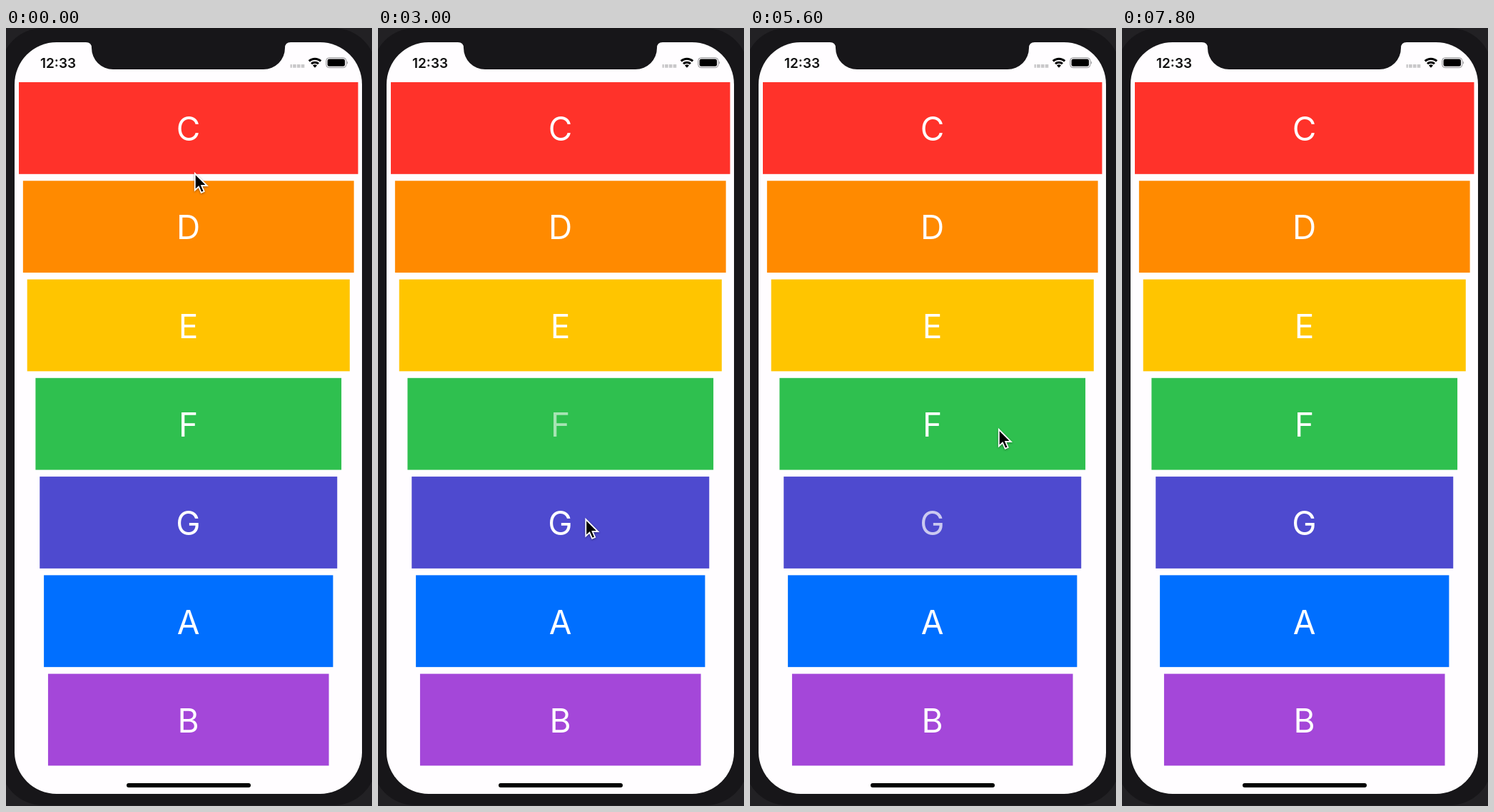
These frames come from a looping animation (513x1091 px, 8 s). An HTML page:

```html
<!DOCTYPE html>
<html lang="en">
<head>
<meta charset="utf-8">
<title>Xylophone</title>
<style>
  html, body { margin: 0; width: 100%; height: 100%; overflow: hidden; background: #222124; }
  svg { display: block; width: 513px; height: 1091px; }
  text { font-family: Inter, "Liberation Sans", sans-serif; }
  .note { font-size: 46px; fill: #fff; text-anchor: middle; }
  #cursor { filter: drop-shadow(0 1.5px 1.5px rgba(0, 0, 0, .4)); }
</style>
</head>
<body>
<svg viewBox="0 0 513 1091">
  <rect x="-8" y="0" width="527" height="1090" rx="60" fill="#171619"/>
  <rect x="12" y="20" width="487" height="1054" rx="59" fill="#fffdff"/>
  <path d="M112 18V20Q120 20 120 28A30 30 0 0 0 150 58H361A30 30 0 0 0 391 28Q391 20 399 20V18Z" fill="#171619"/>

  <text x="48" y="56" font-size="19" font-weight="600" fill="#111">12:33</text>
  <path d="M398.5 53.4H419" stroke="#c9c8ca" stroke-width="4.8" stroke-dasharray="4.6 1.2" stroke-dashoffset="2.2"/>
  <g fill="none" stroke="#000" stroke-width="3">
    <path d="M424.7 46.4A12.3 12.3 0 0 1 441.3 46.4"/>
    <path d="M428 50.1A7.4 7.4 0 0 1 438 50.1"/>
    <path d="M433 55.8L430 52.6A4.4 4.4 0 0 1 436 52.6Z" fill="#000" stroke="none"/>
  </g>
  <rect x="448.8" y="41.8" width="28" height="13.8" rx="4" fill="none" stroke="#8d8c8f"/>
  <rect x="450.6" y="43.6" width="24.4" height="10.2" rx="2.4"/>
  <path d="M478 46.3Q480 48.7 478 51.1Z" fill="#8d8c8f"/>

  <g id="bars"></g>
  <rect x="169" y="1059" width="174" height="6" rx="3"/>
  <path id="cursor" d="M.8 2V25.5L6 20.5L9.7 28.8L13.7 27.1L10.1 19H17.8Z" stroke="#fff" stroke-width="1.8"/>
</svg>
<script>
const LOOP = 8000, STEP = 200, HOLD = 200, RECOVER = 400;
const FIRST_PRESS = 1240, BEAT = 508;
const PITCH = 138.27, INDENT = 5.85;

const melody = "CDEFGABAGFEDC";
const colors = ["#ff322a", "#ff8a00", "#ffc500", "#2fc04f", "#4e4acf", "#006fff", "#a447d9"];

// turning points of the pointer: time, x, y
const path = [
  [0, 264, 202], [FIRST_PRESS, 264, 165], [2200, 286, 460], [3800, 295, 914], [4288, 298, 960],
  [4800, 290, 850], [5600, 348, 561], [7000, 320, 297], [7700, 300, 125]
];

const group = document.getElementById("bars");
const cursor = document.getElementById("cursor");

function add(tag, attrs) {
  const el = document.createElementNS("http://www.w3.org/2000/svg", tag);
  for (const key in attrs) el.setAttribute(key, attrs[key]);
  return group.appendChild(el);
}

const bars = colors.map((fill, i) => {
  const name = melody[i];
  const y = 76 + i * PITCH;
  // the indent doubles once, between E and F
  const inset = INDENT * (i + (i > 2));
  const rect = add("rect", { x: 18 + inset, y, width: 475.5 - 2 * inset, height: 128.8, fill });
  const label = add("text", { class: "note", x: 255.5, y: y + 82.2 });
  label.textContent = name;
  return { name, rect, label };
});

function pointerAt(t) {
  const i = path.findIndex(p => p[0] > t);
  if (i < 0) return null;
  const [t0, x0, y0] = path[i - 1], [t1, x1, y1] = path[i];
  const k = (t - t0) / (t1 - t0);
  return [x0 + (x1 - x0) * k, y0 + (y1 - y0) * k];
}

function sincePress(name, t) {
  const beat = Math.floor((t - FIRST_PRESS) / BEAT);
  const last = beat < 0 ? -1 : melody.lastIndexOf(name, beat);
  return last < 0 ? Infinity : t - FIRST_PRESS - last * BEAT;
}

function draw() {
  const t = Math.floor(performance.now() % LOOP / STEP) * STEP;
  for (const { name, rect, label } of bars) {
    const age = sincePress(name, t);
    const k = Math.min(1, age / RECOVER);
    rect.setAttribute("fill-opacity", age < HOLD ? 0.55 : 1);
    label.setAttribute("opacity", 0.35 + 0.65 * k * k);
  }
  const tip = pointerAt(t);
  cursor.setAttribute("visibility", tip ? "visible" : "hidden");
  if (tip) cursor.setAttribute("transform", `translate(${tip})`);
  requestAnimationFrame(draw);
}
draw();
</script>
</body>
</html>
```
